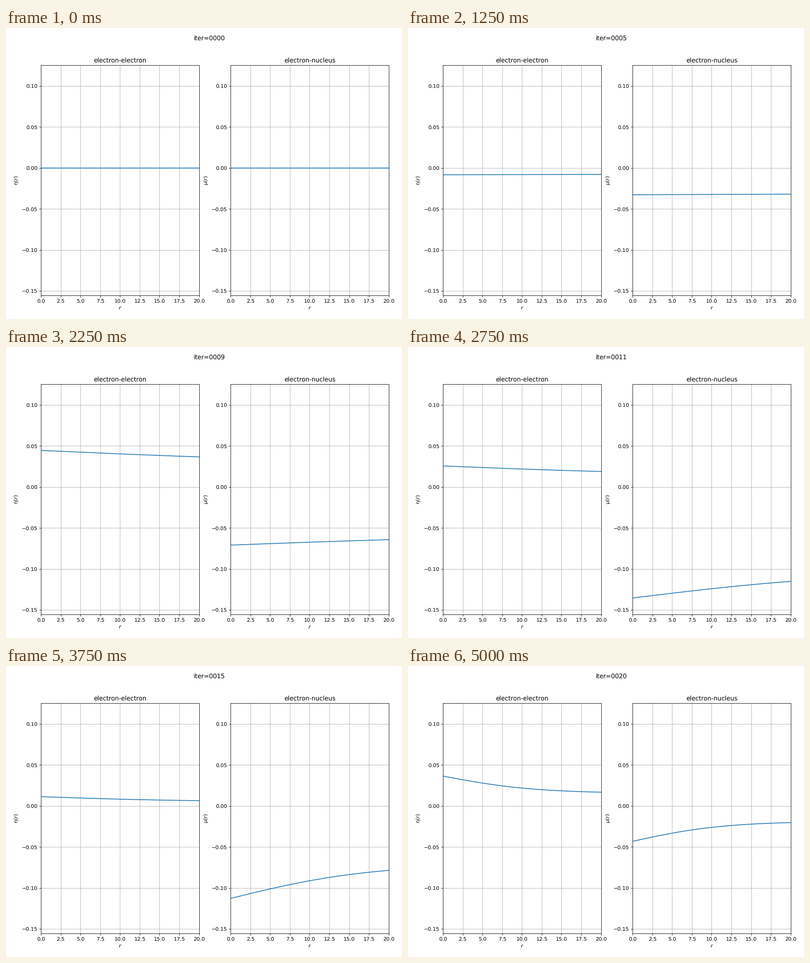
Recreate the animation shown at these times as a matplotlib script. Size 873 px wide and 642 px high, loop 5250 ms.

```python
import numpy as np
import matplotlib.pyplot as plt
from matplotlib.animation import FuncAnimation

W, H, DPI = 873, 642, 96
S = 81.84 / DPI  # scale of the default point sizes
FRAMES, INTERVAL = 21, 250

plt.rcParams.update({
    "font.family": "DejaVu Sans",
    "font.size": 10 * S,
    "text.hinting": "none",
    "axes.linewidth": 0.8 * S,
    "axes.titlepad": 6 * S,
    "axes.labelpad": 4 * S,
    "grid.linewidth": 0.8 * S,
    "lines.linewidth": 1.5 * S,
})
for axis in ("xtick", "ytick"):
    plt.rcParams.update({
        f"{axis}.major.width": 0.8 * S,
        f"{axis}.major.size": 3.5 * S,
        f"{axis}.major.pad": 3.5 * S,
    })

# Key points (iteration, value at r = 0) after the first optimiser step
ETA = [(1, 0.125), (3, -0.0202), (7, 0.0517), (11, 0.0256), (14, 0.0086),
       (17, 0.0236), (20, 0.0364)]
MU = [(1, -0.125), (3, -0.1114), (5, -0.0327), (7, -0.0316), (9, -0.0709),
      (11, -0.1354), (12.5, -0.157), (14, -0.1349), (17, -0.0662),
      (20, -0.0431)]

r = np.linspace(0, 20, 201)


def ease(n, keys):
    """Cubic Hermite curve through the key points."""
    t, v = np.array(keys).T
    slope = np.gradient(v, t)
    i = min(np.searchsorted(t, n, side="right") - 1, len(t) - 2)
    h = t[i + 1] - t[i]
    u = (n - t[i]) / h
    s = u * u * (3 - 2 * u)
    bulge = h * u * (1 - u) * ((1 - u) * slope[i] - u * slope[i + 1])
    return v[i] + (v[i + 1] - v[i]) * s + bulge


def profile(n, keys, depth, pace, power):
    """Curve that starts flat and bends more with every iteration."""
    if n == 0:
        return 0 * r
    drop = depth * np.tanh((n / pace) ** power)
    bend = 1.73 * (n / 20) ** 1.5
    return ease(n, keys) * (1 - drop * np.tanh(bend * r / 20) / np.tanh(bend))


def make_panel(left, title, ylabel):
    top, bottom, width = 82.4, 589.9, 348.5
    ax = fig.add_axes([left / W, 1 - bottom / H, width / W, (bottom - top) / H])
    ax.set(xlim=(0, 20), ylim=(-0.1554, 0.1251), title=title,
           xlabel="$r$", ylabel=ylabel)
    ax.set_xticks(np.arange(0, 20.1, 2.5))
    ax.set_yticks(np.arange(-3, 3) * 0.05)
    ax.grid(True)
    return ax.plot(r, 0 * r, color="#1f77b4")[0]


fig = plt.figure(figsize=(W / DPI, H / DPI), dpi=DPI, facecolor="white")
eta_line = make_panel(77.1, "electron-electron", "η($r$)")
mu_line = make_panel(495.2, "electron-nucleus", "μ($r$)")
heading = fig.text(448 / W, 1 - 27.2 / H, "", fontsize=12 * S,
                   ha="center", va="baseline")


def update(n):
    heading.set_text(f"iter={n:04d}")
    eta_line.set_ydata(profile(n, ETA, 0.565, 15, 2.2))
    mu_line.set_ydata(profile(n, MU, 0.8, 22, 2.4))
    return heading, eta_line, mu_line


anim = FuncAnimation(fig, update, frames=FRAMES, interval=INTERVAL,
                     repeat=True, repeat_delay=0)
plt.show()
```
